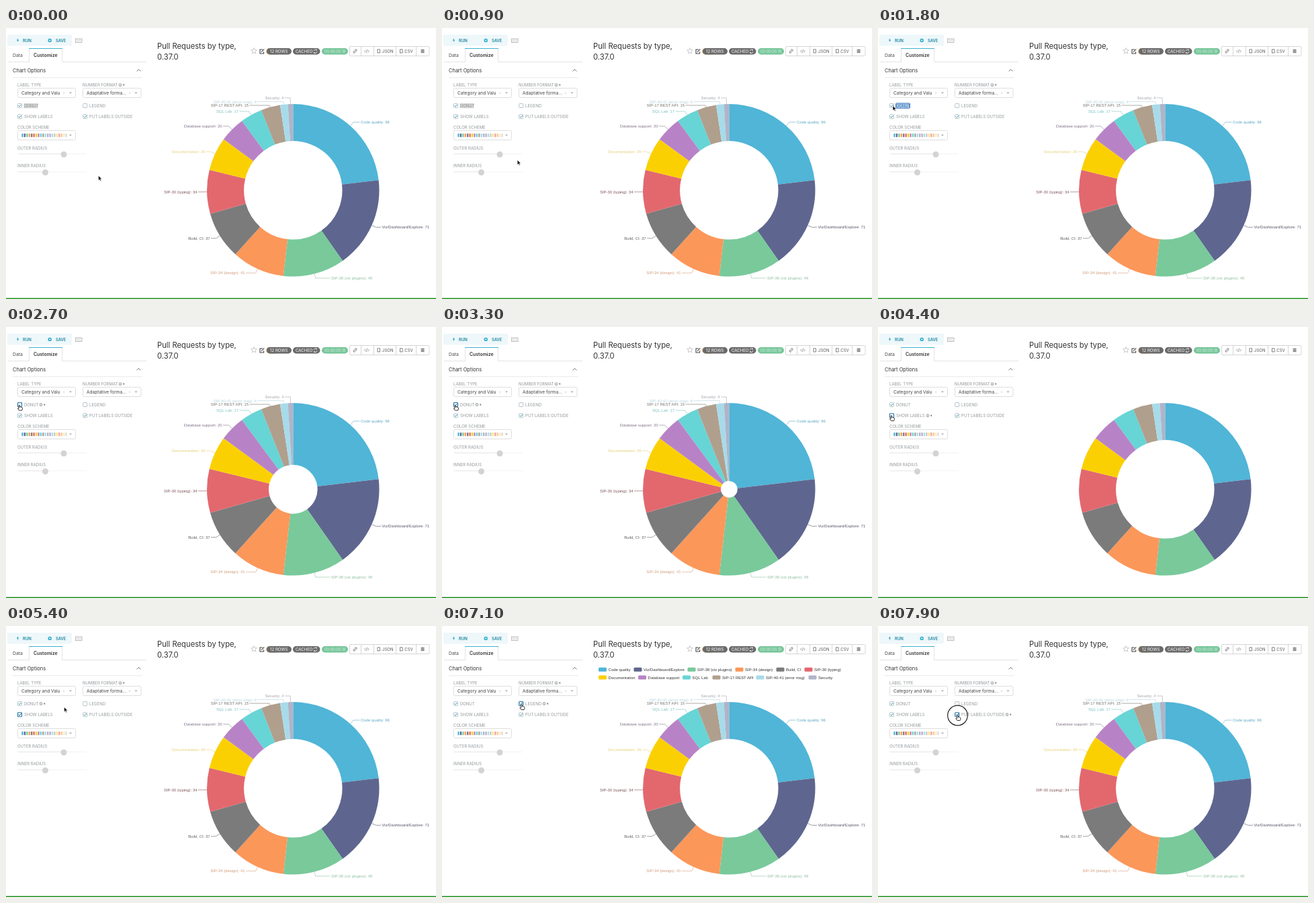
Recreate the animation shown at these times as an HTML page. Size 640x403 px, loop 8 s.

```html
<!DOCTYPE html>
<html lang="en">
<head>
<meta charset="utf-8">
<title>Chart options</title>
<style>
  html, body { margin: 0; width: 100%; height: 100%; overflow: hidden; background: #fff; }
  svg { display: block; width: 640px; height: 403px; }
  text { font-family: Inter, "Liberation Sans", sans-serif; white-space: pre; }
  .chart text { font-family: "Liberation Sans", Arial, sans-serif; font-size: 5.95px; }
  .cap { font-size: 6px; fill: #92979b; }
  .line { fill: none; stroke: #ccc; stroke-width: .8; }
</style>
</head>
<body>
<svg id="stage" viewBox="0 0 640 403" xmlns="http://www.w3.org/2000/svg"></svg>
<script>
const LOOP = 8000, STEP = 100;
const CX = 427.3, CY = 241.3, R = 128.2, HOLE = 73.2;

// name, value, fill, label colour, label x, label y, legend x
const slices = [
  ['Code quality', 96, '#50b5d7', '#5aa6c2', 528, 140, 233],
  ['Viz/Dashboard/Explore', 71, '#5e668f', '#55586a', 559.5, 296.3, 285.5],
  ['SIP-38 (viz plugins)', 48, '#79c99b', '#8fbfa3', 484, 372, 365.5],
  ['SIP-34 (design)', 41, '#fc975a', '#d29c7c', 355.5, 364.3, 436.5],
  ['Build, CI', 37, '#7b7b7b', '#606060', 303.5, 312.8, 497.5],
  ['SIP-30 (typing)', 34, '#e2686e', '#80545a', 284.5, 243.8, 539.5],
  ['Documentation', 26, '#fbd003', '#e6cf78', 296.5, 184, 233],
  ['Database support', 20, '#b883c6', '#80748a', 321.5, 146, 292],
  ['SQL Lab', 17, '#67d4d5', '#7cc0c2', 346, 124, 358],
  ['SIP-17 REST API', 15, '#b09f8d', '#77736e', 361, 115, 402.5],
  ['SIP-40-41 (error msg)', 6, '#a7dbea', '#b5d3dc', 373, 109.5, 467.5],
  ['Security', 4, '#b0b4c9', '#a2a4ac', 413.5, 104, 545.5]
];

const stage = document.getElementById('stage');
function add(parent, tag, attrs, body) {
  const el = document.createElementNS(stage.namespaceURI, tag);
  for (const k in attrs) el.setAttribute(k, attrs[k]);
  if (body) el.textContent = body;
  parent.appendChild(el);
  return el;
}
const group = (attrs, parent = stage) => add(parent, 'g', attrs);
const rect = (x, y, width, height, fill, more, parent = stage) =>
  add(parent, 'rect', { x, y, width, height, fill, ...more });
const path = (d, more, parent = stage) => add(parent, 'path', { d, class: 'line', ...more });
const label = (x, y, size, fill, body, weight = 400, parent = stage) =>
  add(parent, 'text', { x, y, 'font-size': size, fill, 'font-weight': weight }, body);
const caption = (x, y, body, parent = stage) => add(parent, 'text', { x, y, class: 'cap' }, body);
const show = (el, on) => el.setAttribute('visibility', on ? 'visible' : 'hidden');

const BOLT = 'M2.6 0L0 3.6H1.8L1.2 6.4L4 2.6H2.2Z';
function hints(x, y, parent = stage) {
  const g = group({}, parent);
  add(g, 'circle', { cx: x, cy: y, r: 2.1, fill: '#fff', stroke: '#8a8f93', 'stroke-width': .7 });
  rect(x - .4, y - .3, .8, 1.5, '#666', {}, g);
  rect(x - .4, y - 1.3, .8, .6, '#666', {}, g);
  add(g, 'path', { d: BOLT, fill: '#70767a', transform: `translate(${x + 3.8} ${y - 2.3}) scale(.72)` });
  return g;
}

function topBar() {
  rect(2, 10, 96, 16.5, '#eef7fa', { rx: 1.5 });
  add(stage, 'path', { d: BOLT, fill: '#20a7c9', transform: 'translate(15.6 15.2) scale(.95)' });
  label(25, 20.6, 6, '#1985a0', 'RUN', 600);
  add(stage, 'circle', { cx: 65.2, cy: 18.4, r: 2.7, fill: '#20a7c9' });
  path('M63.7 18.4h3M65.2 16.9v3', { style: 'stroke:#fff' });
  label(74, 20.6, 5.8, '#1985a0', 'SAVE', 600);
  rect(103.5, 16, 9.5, 5.5, '#fff', { stroke: '#aaa', 'stroke-width': .8 });
  path('M105 17.8h6.6M105 19.7h6.6', { style: 'stroke:#aaa', 'stroke-dasharray': '1 .8' });

  path('M3 50.5H34.5V30.5M83.5 30.5V50.5H209', { style: 'stroke:#ddd' });
  rect(34, 30, 50, 1, '#3fb2cf');
  label(10, 43.2, 6.8, '#484848', 'Data');
  label(41, 43.2, 6.9, '#333', 'Customize', 600);
  label(10, 66, 7.5, '#333', 'Chart Options');
  path('M194.6 64.4L197.5 61.4L200.4 64.4', { style: 'stroke:#555' });
  path('M10 73.8H203', { style: 'stroke:#e3e3e3' });
}

function select(x, y, w, caret) {
  rect(x, y, w, 14, '#fff', { rx: 2, class: 'line', style: 'stroke:#d6d6d6' });
  add(stage, 'path', { d: `M${caret - 2} ${y + 6}h4l-2 2.3z`, fill: '#aaa' });
}

function slider(y, x) {
  path(`M17.5 ${y - .8}H${x}`, { style: 'stroke:#ddd' });
  path(`M${x} ${y - .8}H120`, { style: 'stroke:#ddd', 'stroke-dasharray': '1 1' });
  add(stage, 'circle', { cx: x, cy: y, r: 4.5, fill: '#d3d3d3' });
}

function controls() {
  caption(17, 87, 'LABEL TYPE');
  caption(114, 87, 'NUMBER FORMAT');
  hints(170, 84.8);
  select(17.5, 89.5, 86, 96);
  select(114.5, 89.5, 86.5, 193.5);
  label(23, 99.2, 6.6, '#444', 'Category and Value');
  rect(81, 91, 10, 11, '#fff');
  label(120, 99.2, 6.55, '#444', 'Adaptative forma…');
  for (const x of [86, 184]) path(`M${x - 1.1} 95.7l2.2 2.2m0 -2.2l-2.2 2.2`, { style: 'stroke:#c4c4c4;stroke-width:.6' });

  caption(17, 150, 'COLOR SCHEME');
  select(17.5, 152.5, 86, 96);
  const hues = [...slices.map(s => s[2]), '#c5a5cf', '#9ee5e5', '#d1c6bc', '#fee386', '#efa1aa', '#f9c7a2', '#ffe9b0', '#dcdcdc'];
  hues.forEach((c, i) => rect(23.4 + i * 3.42, 157, 2.3, 5.2, c));
  caption(17, 181, 'OUTER RADIUS');
  slider(188, 86);
  caption(17, 207, 'INNER RADIUS');
  slider(214.7, 58.5);
}

function header() {
  label(225, 31, 11.25, '#333', 'Pull Requests by type,');
  label(225, 47, 11.25, '#333', '0.37.0');
  const star = Array.from({ length: 10 }, (_, i) => {
    const r = i % 2 ? 2 : 4.6, a = i * Math.PI / 5;
    return `${369 + r * Math.sin(a)} ${34.2 - r * Math.cos(a)}`;
  });
  path('M' + star.join('L') + 'Z', { style: 'stroke:#bbb' });
  path('M382 32H378V38H383.6V35.2M380 36L384.2 31.4', { style: 'stroke:#444;stroke-width:1.1' });

  rect(387, 30, 20, 9.4, '#e3b47e', { rx: 4.7 });
  rect(388, 30, 37, 9.4, '#6a6a6a', { rx: 4.7 });
  label(393, 37, 6.1, '#fff', '12 ROWS');
  rect(427, 30, 40.5, 9.4, '#6a6a6a', { rx: 4.7 });
  label(431, 37, 6.1, '#fff', 'CACHED');
  path('M458 34.2a2.4 2.4 0 0 1 4.4 -1.2v-1.4m0 1.4h-1.4M462.8 35.2a2.4 2.4 0 0 1 -4.4 1.2v1.4m0 -1.4h1.4', { style: 'stroke:#fff' });
  rect(470, 30, 39, 9.4, '#77c69a', { rx: 4.7 });
  label(474, 36.9, 5.6, '#d5efe0', '00:00:00.18');

  rect(511.5, 27.5, 118.5, 14, '#fff', { rx: 1.5, class: 'line' });
  path('M528.5 27.5v14M547.5 27.5v14M580.5 27.5v14M610.5 27.5v14');
  path('M518.6 35.5l2 -2M518.8 33.2l1 -1a1.3 1.3 0 0 1 1.9 1.9l-1 1M520.4 35.8l-1 1a1.3 1.3 0 0 1 -1.9 -1.9l1 -1', { style: 'stroke:#555' });
  path('M535.4 32.8l-1.8 1.7l1.8 1.7M538.6 32.8l1.8 1.7l-1.8 1.7M537.6 32l-1.2 5', { style: 'stroke:#777;stroke-width:.7' });
  for (const [x, name] of [[553, '.JSON'], [586.5, '.CSV']]) {
    rect(x, 31.9, 3.6, 5, '#fff', { class: 'line', style: 'stroke:#666' });
    label(x + 5.3, 36.8, 6, '#555', name);
  }
  path('M617.6 32.6h5M617.6 34.5h5M617.6 36.4h5', { style: 'stroke:#444;stroke-width:1' });
  rect(0, 401.6, 640, 1.4, '#128a12');
}

function makeBox(x, y, name, hintX) {
  const mark = rect(x - 3, y - 3, 6, 6, '#fff', { rx: .8, 'stroke-width': .8 });
  const tick = path(`M${x - 1.8} ${y}l1.4 1.5l2.6 -3.2`, {});
  const back = rect(x + 6, y - 3.6, 21, 7.4, 'none', { rx: .8 });
  const text = caption(x + 6.4, y + 2.3, name);
  const hint = hints(hintX, y);
  return { mark, tick, back, text, hint };
}

function paintBox(box, on, focus, hover) {
  const edge = focus ? '#1f6f9f' : '#a5b5bd';
  box.mark.setAttribute('stroke', edge);
  box.mark.setAttribute('stroke-width', focus ? 1.1 : .8);
  box.tick.style.stroke = focus ? '#1f5f8b' : '#3d9db8';
  box.tick.style.strokeWidth = 1;
  show(box.tick, on);
  show(box.hint, hover);
}

function makeChart() {
  const g = group({ class: 'chart' });
  const arcs = group({}, g), notes = group({}, g), legend = group({}, g);
  const total = slices.reduce((n, s) => n + s[1], 0);
  let sum = 0;
  const parts = slices.map(([name, value, fill, ink, x, y, lx], i) => {
    const a = sum / total * 2 * Math.PI;
    sum += value;
    const b = sum / total * 2 * Math.PI, mid = (a + b) / 2, right = i < 3;
    const at = r => `${CX + r * Math.sin(mid)} ${CY - r * Math.cos(mid)}`;
    const [bx] = at(R + 7).split(' ');
    path(`M${at(R)}L${bx} ${y}H${right ? x - 1.5 : x + 1.5}`, { style: `stroke:${ink};stroke-width:.6` }, notes);
    add(notes, 'text', { x, y: y + 2.1, fill: ink, 'text-anchor': right ? 'start' : 'end' }, `${name}: ${value}`);
    const ly = i < 6 ? 64.8 : 76.4;
    rect(lx, ly - 3, 12, 6, fill, { rx: 1.5 }, legend);
    add(legend, 'text', { x: lx + 14.6, y: ly + 2.1, fill: '#333' }, name);
    return { el: add(arcs, 'path', { fill }), a, b };
  });
  const point = (r, a) => `${CX + r * Math.sin(a)} ${CY - r * Math.cos(a)}`;
  const setHole = r => parts.forEach(({ el, a, b }) => el.setAttribute('d',
    `M${point(R, a)}A${R} ${R} 0 0 1 ${point(R, b)}L${point(r, b)}A${r} ${r} 0 0 0 ${point(r, a)}Z`));
  return { notes, legend, setHole };
}

function makePointer() {
  const g = group({});
  const arrow = path('M0 0V7.4L1.8 5.8L3 8.4L4.2 7.8L3 5.3H5.4Z', { style: 'fill:#111;stroke:#fff;stroke-width:.6' }, g);
  const hand = path('M-.8 .6Q0 -.6 .8 .6V3Q1.6 2.5 2.2 3.2Q3 2.8 3.4 3.5Q4.4 3.4 4.4 4.4V6L3.6 8H-.6L-2.6 5Q-2.4 3.9 -.8 5Z',
    { style: 'fill:#fff;stroke:#222;stroke-width:.9' }, g);
  const ring = add(g, 'circle', { cx: 0, cy: .5, r: 14.8, fill: 'none', stroke: '#222', 'stroke-width': 1.2 });
  return { g, arrow, hand, ring };
}

topBar();
controls();
header();
const chart = makeChart();
const boxes = [
  makeBox(20.5, 115.5, 'DONUT', 52),
  makeBox(20.5, 131.7, 'SHOW LABELS', 74),
  makeBox(117.7, 115.5, 'LEGEND', 152),
  makeBox(117.7, 131.7, 'PUT LABELS OUTSIDE', 192)
];
const pointer = makePointer();

// time, x, y: eased between neighbours
const route = [
  [700, 137.5, 219.5], [1350, 25, 116], [1600, 25, 116], [1800, 22, 115.5], [2100, 20, 116],
  [3300, 20, 116], [3600, 21, 126.5], [3800, 20, 131.5], [5050, 20, 131.5], [5400, 86.5, 120.5],
  [5800, 118.5, 116.5], [7450, 118.5, 116.5], [7750, 118.5, 132.5]
];
const clicks = [[1400, 1600], [2300, 2600], [2950, 3200], [3900, 4100], [4700, 4900], [6000, 6200], [7200, 7400], [7850, 8000]];
const hands = [[1900, 3350], [3800, 5100], [5750, 8000]];
const hovers = [[[1900, 3400], [5200, 5600]], [[3700, 5200]], [[5600, 7600]], [[7700, 8000]]];
const focus = [[2500, 3900], [3900, 6000], [6000, 7850], [7850, 8000]];
const within = (t, spans) => spans.some(([a, b]) => t >= a && t < b);
const clamp = k => Math.max(0, Math.min(1, k));
const cubicOut = k => 1 - (1 - clamp(k)) ** 3;

function place(t) {
  let [, x, y] = route[0];
  for (let i = 1; i < route.length; i++) {
    const [t0, x0, y0] = route[i - 1], [t1, x1, y1] = route[i];
    if (t < t0) break;
    const k = clamp((t - t0) / (t1 - t0)), e = k * k * (3 - 2 * k);
    x = x0 + (x1 - x0) * e;
    y = y0 + (y1 - y0) * e;
  }
  return [x, y];
}

function draw(t) {
  const legendOn = t >= 6200 && t < 7400;
  const labelsOn = t < 4100 || t >= 4900;
  const donutOn = t < 2600 || t >= 3200;
  chart.setHole(HOLE * (1 - cubicOut((t - 2600) / 480) + cubicOut((t - 3270) / 500)));
  show(chart.notes, labelsOn);
  show(chart.legend, legendOn);

  const checked = [donutOn, labelsOn, legendOn, true];
  boxes.forEach((box, i) => paintBox(box, checked[i], within(t, [focus[i]]), within(t, hovers[i])));
  const picked = t < 1900, active = picked && t >= 1450;
  const { back, text } = boxes[0];
  back.setAttribute('fill', active ? '#a9cbee' : picked ? '#d6d6d6' : 'none');
  back.setAttribute('stroke', active ? '#4a80bd' : 'none');
  text.style.fill = active ? '#4674a6' : '';

  const hand = within(t, hands);
  pointer.g.setAttribute('transform', `translate(${place(t).join(' ')})`);
  show(pointer.hand, hand);
  show(pointer.arrow, !hand);
  show(pointer.ring, within(t, clicks));
}

function tick() {
  draw(Math.floor(performance.now() % LOOP / STEP) * STEP);
  requestAnimationFrame(tick);
}
tick();
</script>
</body>
</html>
```
